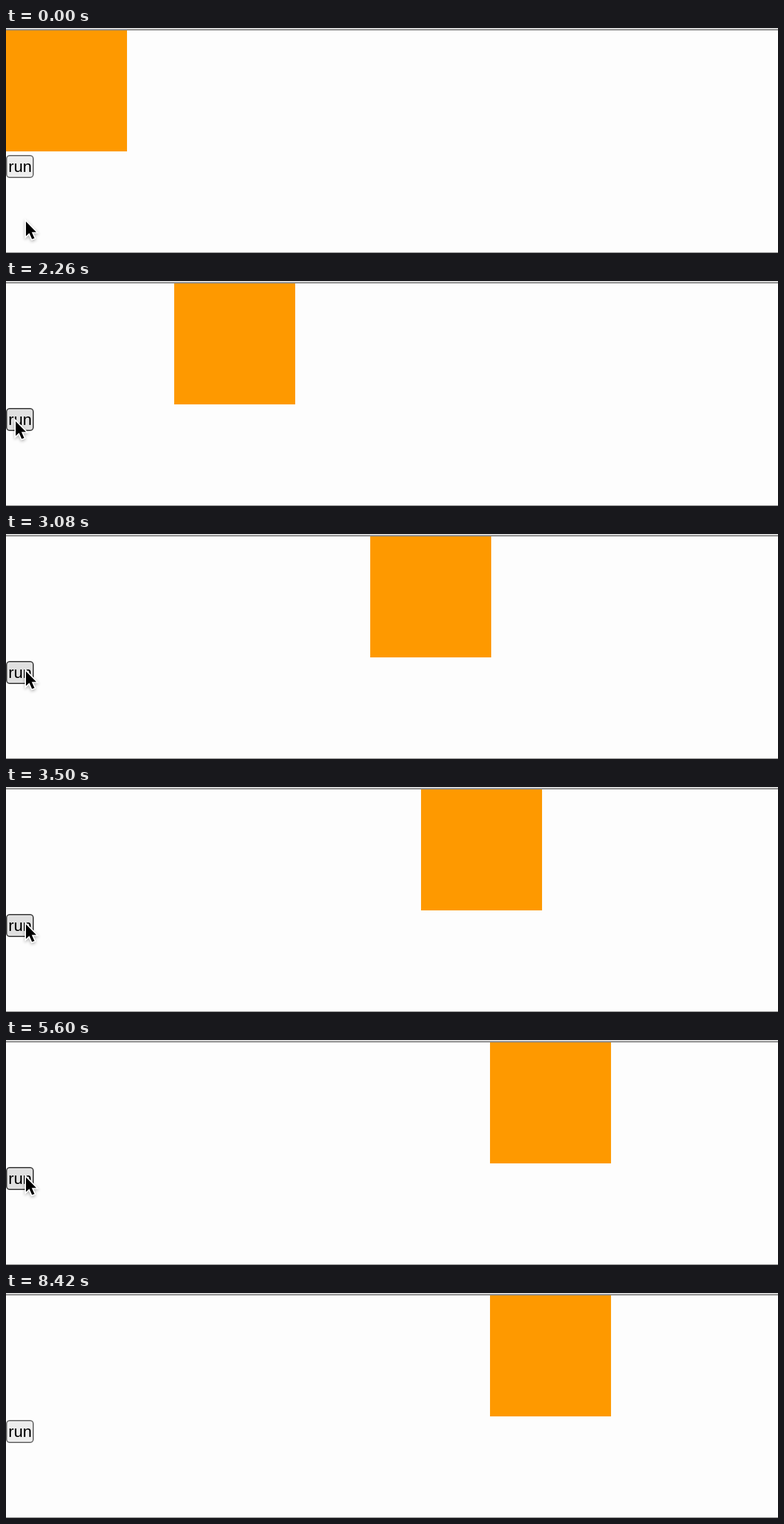
An HTML page with a canvas that plays this animation: 1276x372 px, repeating every 9.12 s.

```html
<!DOCTYPE html>
<html lang="en">
<head>
<meta charset="utf-8">
<title>Easing box</title>
<style>
html, body { margin: 0; width: 100%; height: 100%; overflow: hidden; background: #fdfdfd; }
canvas { display: block; }
</style>
</head>
<body>
<canvas id="stage" width="1276" height="372"></canvas>
<script>
const ctx = document.getElementById('stage').getContext('2d');
const LOOP = 9120;

// The screen refreshes in bursts: 20, 20, then 100 ms.
function tickAt(ms) {
  const t = ms - 120;
  const cycle = Math.floor(t / 140);
  return cycle * 3 + Math.min(2, Math.floor((t - cycle * 140) / 20));
}

// Each step covers a tenth of the remaining way, rounded up.
function boxX(tick) {
  if (tick < 42) return 0;
  let gap = 400;
  for (let n = Math.floor(9.3 + 0.54 * (tick - 56)); n > 0 && gap > 0; n--) {
    gap -= Math.ceil(gap / 10);
  }
  return 2 * (400 - gap);
}

// Up to the button, left to the window edge, back for the click, then away.
function pointerAt(tick) {
  if (tick > 158) return null;
  const ramp = (from, to) => Math.min(1, Math.max(0, (tick - from) / (to - from)));
  const rise = ramp(-2, 11);
  const toEdge = ramp(14, 24);
  const back = ramp(41, 42);
  const press = ramp(42, 55);
  const settle = ramp(56, 62);
  const leave = ramp(145, 158) ** 2;
  return {
    x: 32 - 13 * rise - 19 * toEdge + 12 * back + 7 * press + 13 * settle + 1126 * leave,
    y: 318 - 102 * rise + 19 * toEdge - 3 * back - 4 * press - 3 * settle + 75 * leave,
    resize: toEdge === 1 && back === 0
  };
}

function rect(color, x, y, w, h) {
  ctx.fillStyle = color;
  ctx.fillRect(x, y, w, h);
}

const arrow = new Path2D('M1 2V26L6.5 21L11 31L15 29.5L10.5 19.5H18Z');
const resize = new Path2D('M-4 -2H13V-8L22 0L13 8V2H-4Z');

function drawPointer({ x, y, resize: atEdge }) {
  const shape = atEdge ? resize : arrow;
  ctx.save();
  ctx.translate(Math.round(x), Math.round(y));
  ctx.lineWidth = 4;
  ctx.strokeStyle = '#fff';
  ctx.shadowColor = 'rgba(0, 0, 0, 0.3)';
  ctx.shadowBlur = 5;
  ctx.shadowOffsetY = 2;
  ctx.stroke(shape);
  ctx.shadowColor = 'transparent';
  ctx.fillStyle = '#000';
  ctx.fill(shape);
  ctx.restore();
}

function drawButton(hover) {
  ctx.beginPath();
  ctx.roundRect(1, 211, 44, 36, 5);
  ctx.fillStyle = hover ? '#e0e0e0' : '#ededed';
  ctx.fill();
  ctx.lineWidth = 2;
  ctx.strokeStyle = hover ? '#484848' : '#707070';
  ctx.stroke();
  ctx.fillStyle = '#000';
  ctx.font = '26.67px "Liberation Sans", Arial, sans-serif';
  ctx.fillText('run', 4, 238);
}

function draw(ms) {
  const tick = tickAt(ms);
  const tip = pointerAt(tick);

  rect('#fdfdfd', 0, 0, 1276, 372);
  rect('#dcdcdc', 0, 0, 1276, 2);
  rect('#868686', 0, 2, 1276, 2);
  rect('#777', 0, 371, 1276, 1);
  rect('#fe9900', boxX(tick), 4, 200, 200);

  drawButton(tip && tip.x < 46 && tip.y > 210 && tip.y < 248);
  if (tip) drawPointer(tip);
}

const start = performance.now();
function loop() {
  draw((performance.now() - start) % LOOP);
  requestAnimationFrame(loop);
}
loop();
</script>
</body>
</html>
```
